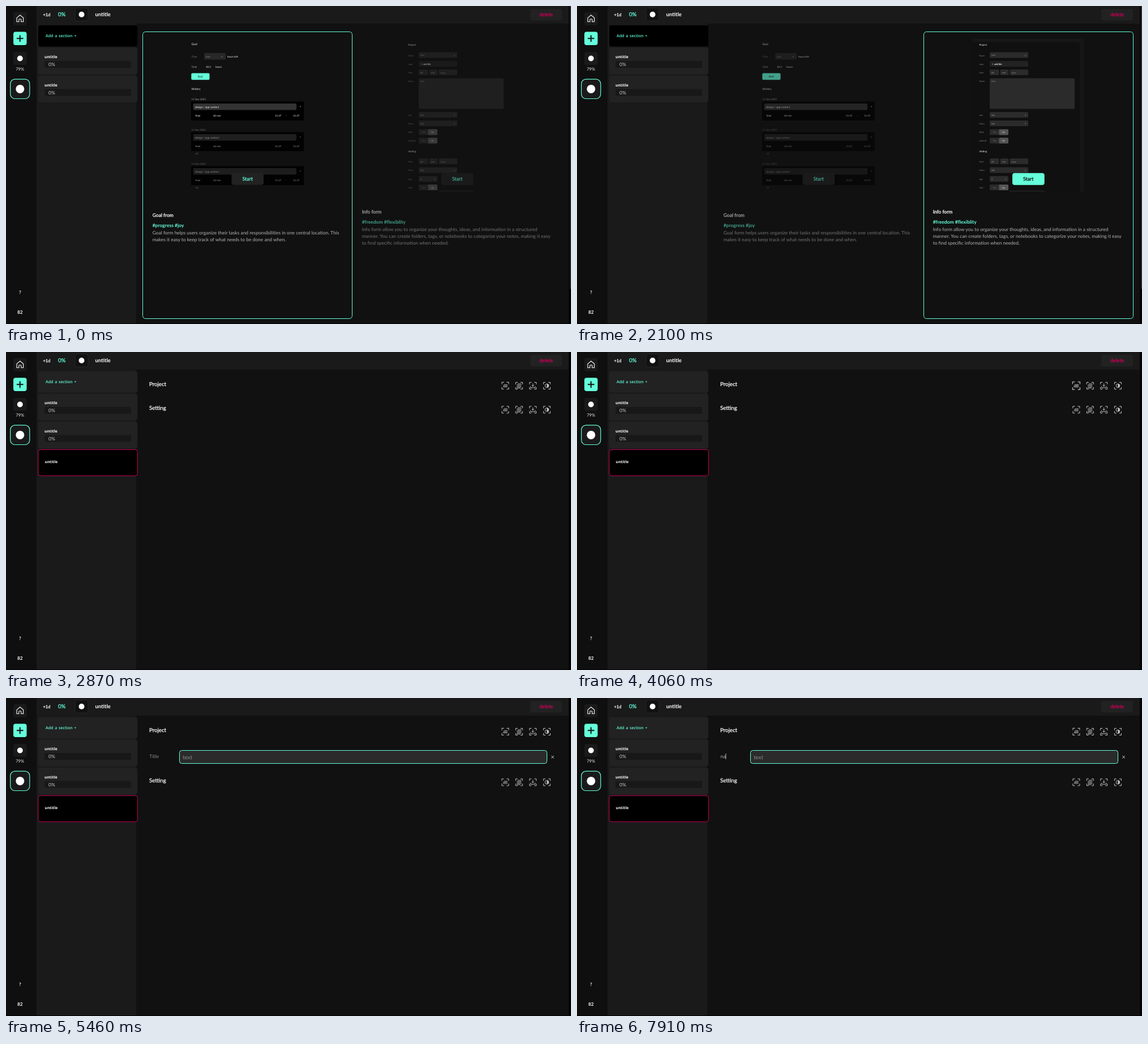
These frames come from a looping animation (998 by 561 pixels, 8 s). An HTML page:

```html
<!DOCTYPE html>
<html lang="en">
<head>
<meta charset="utf-8">
<title>Section builder</title>
<style>
html, body { margin: 0; width: 100%; height: 100%; overflow: hidden; background: #111; }
svg { display: block; width: 998px; height: 561px; }
text { font-family: Lato, Inter, sans-serif; text-rendering: geometricPrecision; white-space: pre; }
.os { font-family: "Open Sans", "Noto Sans", sans-serif; }
.b { font-weight: 700; }
.m { stroke-width: .28px; stroke: currentColor; }

.a { animation: 8s linear infinite; }
.step { animation: 8s step-end infinite; }
.picker { animation-name: picker; }
.form { animation-name: form; }
.goal { animation-name: goal; }
.goal-edge { animation-name: goalEdge; }
.info { animation-name: info; }
.info-edge { animation-name: infoEdge; }
.press { animation-name: press; }
.pop { animation-name: pop; transform-box: fill-box; transform-origin: center; }
.drop { animation-name: drop; }
.field { animation-name: field; }
.focus { animation-name: focus; }
.close { animation-name: close; }
.label { animation-name: label; }
.caret { animation-name: caret; }
.n { animation-name: typeN; }
.na { animation-name: typeNa; }

@keyframes picker { 0% { opacity: 1 } 34.95%, 100% { opacity: 0 } }
@keyframes form { 0% { opacity: 0 } 34.95%, 100% { opacity: 1 } }
@keyframes goal { 0%, 15.3% { opacity: 1 } 18.4%, 100% { opacity: .6 } }
@keyframes goalEdge { 0%, 15.7% { opacity: 1 } 18.4%, 100% { opacity: 0 } }
@keyframes info { 0%, 11% { opacity: .6 } 14.9%, 100% { opacity: 1 } }
@keyframes infoEdge { 0%, 11% { opacity: 0 } 14.9%, 100% { opacity: 1 } }
@keyframes press { 0%, 21.6% { opacity: 0 } 26.2%, 100% { opacity: 1 } }
@keyframes pop {
  0%, 45.9% { transform: scale(1); opacity: .75 }
  47.2%, 50.2% { transform: scale(1.08); opacity: .8 }
  53.4%, 57.2% { transform: scale(1.24); opacity: 1 }
  60.4%, 100% { transform: scale(1); opacity: .75 }
}
@keyframes drop { 0% { transform: none } 56.85%, 100% { transform: translateY(46.8px) } }
@keyframes field { 0% { opacity: 0 } 56.85%, 100% { opacity: 1 } }
@keyframes focus {
  0%, 61.7% { opacity: 0 } 65.6%, 71.3% { opacity: 1 }
  76.1%, 77.4% { opacity: .48 } 77.9% { opacity: .56 } 80.5%, 100% { opacity: 1 }
}
@keyframes close { 0%, 61.7% { opacity: 0 } 65.6%, 100% { opacity: 1 } }
@keyframes label { 0% { opacity: 1 } 89.2% { opacity: 0 } 94.45% { opacity: 1 } 97.95%, 100% { opacity: 0 } }
@keyframes caret { 0% { opacity: 0 } 71.7% { opacity: 1 } 85.7% { opacity: 0 } 94.45% { opacity: 1 } 97.95%, 100% { opacity: 0 } }
@keyframes typeN { 0% { opacity: 0 } 89.2% { opacity: 1 } 94.45% { opacity: 0 } 97.95% { opacity: 1 } 98.82%, 100% { opacity: 0 } }
@keyframes typeNa { 0% { opacity: 0 } 98.82%, 100% { opacity: 1 } }
</style>
</head>
<body>
<svg id="stage" viewBox="0 0 998 561"></svg>
<script>
const MINT = '#64ffda', PINK = '#c80056', WHITE = '#fff', GREY = '#8c8c8c', TILE = '#222';

// shape helpers: boxes are given by their edges, text by its baseline
const box = (x, y, x2, y2, fill, r = 0, more = '') =>
  `<rect x="${x}" y="${y}" width="${x2 - x}" height="${y2 - y}" rx="${r}" fill="${fill}" ${more}/>`;
const edge = (color, w = 1) => `stroke="${color}" stroke-width="${w}"`;
const txt = (x, y, size, str, fill = WHITE, cls = '', anchor = 'start') =>
  `<text x="${x}" y="${y}" font-size="${size}" fill="${fill}" color="${fill}" class="${cls}" text-anchor="${anchor}">${str}</text>`;
const mid = (x, y, size, str, fill, cls) => txt(x, y, size, str, fill, cls, 'middle');
const line = (d, color = WHITE, w = 1) => `<path d="${d}" fill="none" stroke="${color}" stroke-width="${w}"/>`;
const dot = (x, y, r) => `<circle cx="${x}" cy="${y}" r="${r}" fill="${WHITE}"/>`;
const group = (cls, ...parts) => `<g class="${cls}">${parts.join('')}</g>`;
const fade = (o, ...parts) => `<g opacity="${o}">${parts.join('')}</g>`;
const cross = (x, y, s, color, w) => line(`M${x - s} ${y - s}l${2 * s} ${2 * s}m0 ${-2 * s}l${-2 * s} ${2 * s}`, color, w);

function rail() {
  return box(0, 0, 54, 561, '#0f0f0f') +
    box(13, 10.5, 36.5, 34, '#1a1a1a', 4) +
    line('M19 20.8L24.8 16l5.8 4.8V27.8H26.8V24q0-1-1-1H23.800q-1 0-1 1V27.800H19Z', WHITE, 1.1) +
    box(13, 45.5, 36.5, 69, MINT, 4) + line('M24.700 51.500V63.200M18.900 57.300H30.600', '#111', 2) +
    box(13, 81, 36.5, 104, '#1a1a1a', 4) + dot(24.7, 92.5, 5) +
    mid(24.6, 114, 7.6, '79%', '#eee') +
    box(7.7, 129.2, 41.8, 163.5, '#1a1a1a', 8, edge(MINT, 1.2)) + dot(24.8, 146.4, 7.5) +
    mid(24.8, 507.5, 8, '?', WHITE, 'b') + mid(24.7, 543, 8.2, '82', WHITE, 'b');
}

function topBar() {
  return box(54, 0, 994, 31, '#1a1a1a') +
    txt(65.5, 17.8, 7.5, '+1d', WHITE, 'm') + txt(92, 18, 9.6, '0%', MINT, 'm') +
    box(122, 3.5, 145, 26.5, '#121212', 4, edge('#262626')) + dot(133.5, 15, 5) +
    txt(157.5, 17.8, 9.4, 'untitle', WHITE, 'b') +
    box(926, 5, 982, 25.5, TILE, 4) + mid(954.2, 18, 8.8, 'delete', PINK, 'm');
}

function section(y) {
  return box(57, y, 232, y + 47, TILE, 4) +
    txt(68, y + 18.5, 6.7, 'untitle', WHITE, 'os b') +
    box(68, y + 23.5, 221, y + 35.5, '#181818', 2) +
    txt(75, y + 32.6, 8.5, '0%', '#ccc');
}
const addCard = fill => box(57, 34, 232, 71.5, fill, 4) +
  `<text x="70" y="54.700" font-size="7" font-weight="600" word-spacing="1" fill="${MINT}" class="os">Add a section +</text>`;

function entry(y, strength = 1) {
  const row = (x, s) => txt(x, y + 26, 4.4, s);
  return box(327, y, 526, y + 33.5, '#000', 0, `opacity="${strength < 1 ? .85 : 1}"`) +
    fade(strength, txt(327.5, y - 2.5, 4.4, '11 Nov 2023', '#aaa'),
      box(330.5, y + 3.5, 513, y + 15, '#333', 2),
      txt(334, y + 11, 4.7, 'design / app contect'), mid(520, y + 10.5, 5, '×', '#ddd'),
      row(334, 'Total'), row(366, '60 min'), row(475, '11:37'), row(494, '-'), row(507, '11:37'),
      strength < 1 ? txt(334, y + 39, 4.4, '+2', '#ccc') : '');
}

function startButton(x, y) {
  return box(x, y, x + 56.5, y + 21.2, TILE, 4) + mid(x + 28.2, y + 13.3, 8.7, 'Start', MINT, 'm');
}

function about(x, y, title, tags, lines) {
  return txt(x, y, 8.5, title, WHITE, 'm') + txt(x, y + 17.5, 8.5, tags, MINT, 'b') +
    lines.map((s, i) => txt(x, y + 31 + i * 11.9, 8.43, s, '#b4b4b4')).join('');
}

function goalCard() {
  return group('a goal',
    txt(327.5, 69, 5, 'Goal'), txt(327.5, 90.5, 4.6, 'Time', '#777'),
    box(350, 83, 388, 94.5, '#282828', 2), txt(353, 90.5, 4.5, 'text', '#888'), mid(381.5, 90.8, 5, '×', '#aaa'),
    txt(391, 90.5, 4.5, 'hours left'),
    txt(327.5, 108.5, 4.6, 'Total', '#aaa'), txt(353, 108.5, 4.5, '10.5'), txt(370, 108.5, 4.5, 'hours'),
    box(327.3, 118.6, 359.5, 130.2, MINT, 2), mid(343.2, 126.2, 4.6, 'Start', '#111'),
    txt(327.5, 148, 5, 'History'),
    entry(168.5), entry(222.5, .6), entry(282.5, .55),
    startButton(398.5, 294.5),
    about(258.7, 372, 'Goal from', '#progress #joy', [
      'Goal form helps users organize their tasks and responsibilities in one central location. This',
      'makes it easy to keep track of what needs to be done and when.']));
}

function infoCard() {
  const cell = (x, x2, y, s, fill = '#2b2b2b') => box(x, y, x2, y + 10, fill, 1.5) + txt(x + 3, y + 6.6, 4, s, '#999');
  const pick = (y, s) => cell(729, 797, y, s) + mid(792, y + 7, 4.6, '×', '#aaa');
  const date = y => cell(729, 745.5, y, 'dd') + cell(747.5, 762.5, y, 'mm') + cell(764.5, 797, y, 'yyyy');
  const toggle = y => cell(729, 762, y, '') + box(745.5, y, 762, y + 10, '#555', 1.5) +
    mid(737.5, y + 6.6, 3.8, 'Yes', '#777') + mid(753.7, y + 6.6, 3.8, 'No', '#ddd');
  const labels = [['Name', 88.5], ['Logo', 103.5], ['Start', 118.5], ['Notes', 134], ['Link', 193.5], ['Policy', 208.5],
    ['NDA', 224], ['Android', 239], ['Start', 276], ['Policy', 291], ['Age', 306.5], ['Paid', 321.5]];
  return group('a info',
    group('a info-edge', box(699, 57.5, 895, 327, '#171717'),
      '<path d="M699 63.500H882q7 0 7 7V327H699Z" fill="#101010"/>'),
    txt(710.5, 70, 4.4, 'Project'), txt(710.5, 258, 4.4, 'Setting'),
    labels.map(([s, y]) => txt(710.5, y, 3.7, s, '#888')).join(''),
    pick(81.5, 'text'), cell(729, 797, 97, '', '#222'), txt(733, 103.6, 4, '+  add file', WHITE, 'b'),
    date(112), box(729, 127.5, 879, 181.5, '#2b2b2b', 2), txt(732, 134, 4, 'text', '#999'),
    pick(187, 'link'), pick(202, 'link'), toggle(217.5), toggle(232.5),
    date(269), pick(284.5, 'link'), cell(729, 762, 300, '0'), mid(757, 307, 4.6, '×', '#aaa'), toggle(315),
    box(764, 325.8, 826, 327, '#2b2b2b'),
    startButton(769, 294.8),
    group('a press', box(769, 294.8, 825.7, 315.8, MINT, 4), mid(797.2, 308.1, 8.7, 'Start', '#111', 'm')),
    about(628.7, 366, 'Info form', '#freedom #flexiblity', [
      'Info form allow you to organize your thoughts, ideas, and information in a structured',
      'manner. You can create folders, tags, or notebooks to categorize your notes, making it easy',
      'to find specific information when needed.']));
}

// bracketed tool icon centred on x, y
function tool(x, y, inner, cls = '') {
  const corner = 'M-6 -2.500V-6H-2.500M2.500 -6H6V-2.500M6 2.500V6H2.500M-2.500 6H-6V2.500';
  return `<g transform="translate(${x} ${y})"><g class="${cls}" opacity=".75">${line(corner)}${inner}</g></g>`;
}
function heading(y, title, cls) {
  return txt(253, y + .5, 9.7, title, WHITE, 'm') +
    tool(881.9, y, line('M-2.500 -1.700H3.800M-4 .2H3.800M-4 2.100H3.800', WHITE, .9), cls) +
    tool(906.3, y, line('M-2.500 -3.500H4M-4 -1.500H4M-4 .5H4M-4 2.500H4M-4 4.200H2', WHITE, .9)) +
    tool(930.7, y, line('M0 -4V1M-2 -1L0 1.200L2 -1M-4 1V3.500H4V1')) +
    tool(955.4, y, `<circle r="3.300" fill="none" ${edge(WHITE)}/><path d="M0 -3.300A3.300 3.300 0 0 1 0 3.300Z" fill="#fff"/>`);
}

function formView() {
  const caret = x => line(`M${x} 98V108`, '#ddd', .9);
  const typed = s => txt(253.2, 106.3, 8.6, s, '#aaa');
  return box(994, 0, 998, 561, '#040404') + addCard(TILE) +
    box(57, 172.2, 232.3, 218.3, '#000', 4, edge(PINK)) + txt(68.5, 195.7, 6.7, 'untitle', WHITE, 'os b') +
    heading(59.5, 'Project', 'a pop') +
    group('step drop', heading(101.8, 'Setting')) +
    group('step field',
      box(305.7, 92.5, 956.3, 115.7, '#2b2b2b', 4), txt(312.2, 107.7, 9.6, 'text', GREY),
      group('a focus', box(306.5, 92.5, 955.5, 115.5, 'none', 4, edge(MINT))),
      group('a close', cross(965.6, 104.2, 2.2, '#ddd', 1)),
      group('step label', txt(253.2, 106.3, 8.6, 'Title', GREY)),
      group('step caret', caret(253.5)),
      group('step n', typed('n'), caret(258.3)),
      group('step na', typed('na'), caret(262.8)));
}

function pickerView() {
  return box(994, 0, 998, 561, '#040404') + box(996, 0, 998, 499, '#2a2a2a') + addCard('#000') +
    goalCard() + infoCard() +
    group('a goal-edge', box(241.5, 45.5, 611.5, 551.5, 'none', 5, edge(MINT))) +
    group('a info-edge', box(612.5, 45.5, 982.5, 551.5, 'none', 5, edge(MINT)));
}

document.getElementById('stage').innerHTML =
  box(0, 0, 998, 561, '#111') + rail() + topBar() + box(54, 31, 230, 561, '#1a1a1a') +
  section(73.5) + section(123) +
  group('step picker', pickerView()) + group('step form', formView()) +
  box(0, 560, 998, 561, '#000');
</script>
</body>
</html>
```
